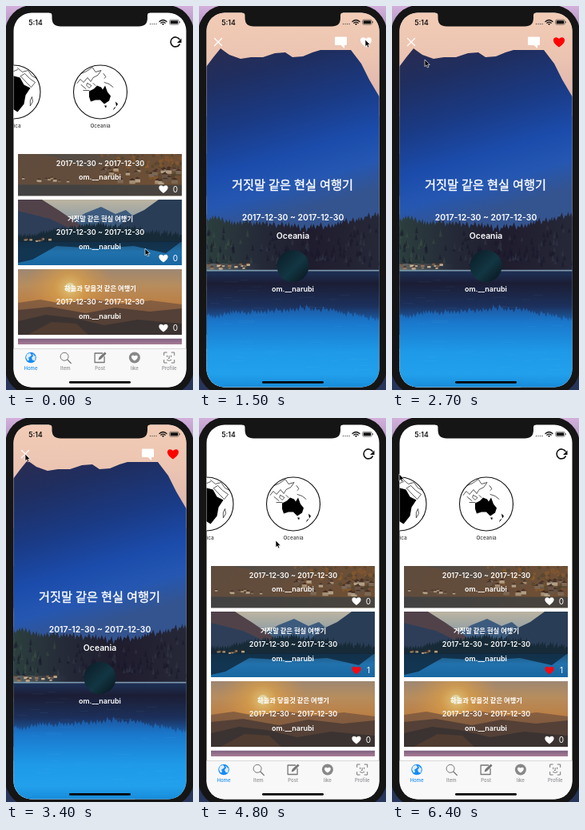
Recreate the animation shown at these times as an HTML page. Size 234x480 px, loop 6.5 s.

```html
<!DOCTYPE html>
<html lang="ko">
<head>
<meta charset="utf-8">
<title>Travel diary</title>
<style>
html, body { margin: 0; width: 100%; height: 100%; overflow: hidden; background: #111; }
svg { display: block; width: 100%; height: 100%; }
text { font-family: Inter, "Noto Sans CJK KR", "Noto Sans CJK", sans-serif; text-anchor: middle; }
.card text { fill: #fff; font-weight: 600; font-size: 9px; }
.card .title { font-weight: 700; font-size: 8.3px; }
.card .count { font-weight: 400; font-size: 10px; }
#detail text { fill: #fff; font-weight: 600; font-size: 10.4px; }
#detail .title { font-weight: 500; font-size: 15.2px; stroke: #fff; stroke-width: .35px; }
#detail .author { font-size: 9px; }
.line { fill: none; stroke-linecap: round; stroke-linejoin: round; }
</style>
</head>
<body>
<svg id="stage" viewBox="0 0 234 480" preserveAspectRatio="none"></svg>
<script>
const LOOP = 6500, STEP = 100, WIDTH = 216;
const PUSH_AT = 270, LIKE_AT = 1700, POP_AT = 3914, SETTLE = 620;
const DATES = "2017-12-30 ~ 2017-12-30", AUTHOR = "om.__narubi";
const TITLE = "거짓말 같은 현실 여행기";
const HEART = "M0 5C-8 0-6-4.7-3-4.7-1.3-4.7-.4-3.9 0-3.1.4-3.9 1.3-4.7 3-4.7 6-4.7 8 0 0 5Z";

let seed = 7;
const random = () => (seed = seed * 16807 % 2147483647) / 2147483647;
const between = (a, b) => a + (b - a) * random();
const repeat = (n, make) => Array.from({ length: n }, (_, i) => make(i)).join("");

const gradient = (id, stops, direction = 'x2="0" y2="1"') =>
  `<linearGradient id="${id}" ${direction}>${stops.map(([at, color, alpha = 1]) =>
    `<stop offset="${at}" stop-color="${color}" stop-opacity="${alpha}"/>`).join("")}</linearGradient>`;
const rect = (x, y, w, h, fill, more = "") =>
  `<rect x="${x}" y="${y}" width="${w}" height="${h}" fill="${fill}" ${more}/>`;
const path = (d, fill, more = "") => `<path d="${d}" fill="${fill}" ${more}/>`;
const line = (d, stroke, width = 1, more = "") =>
  `<path class="line" d="${d}" stroke="${stroke}" stroke-width="${width}" ${more}/>`;
const text = (x, y, value, more = "") => `<text x="${x}" y="${y}" ${more}>${value}</text>`;
const heart = (x, y, scale, fill, more = "") =>
  path(HEART, fill, `transform="translate(${x} ${y}) scale(${scale})" ${more}`);

// Jagged conifer outline whose top follows topAt(x)
function forest(x0, x1, base, topAt, gap, jag) {
  let d = `M${x0} ${base}`;
  for (let x = x0; x < x1; x += gap * between(.7, 1.3)) {
    const top = topAt(x) - between(0, jag);
    d += `L${x.toFixed(1)} ${(top + jag * .9).toFixed(1)}L${(x + gap / 2).toFixed(1)} ${top.toFixed(1)}`;
  }
  return d + `L${x1} ${base}Z`;
}

const houses = (n, x0, x1, y0, y1, size) => repeat(n, () => {
  const x = between(x0, x1), y = between(y0, y1), w = between(.6, 1) * size;
  const wall = ["#b9a184", "#8d7660", "#c8b497", "#75604f"][Math.floor(between(0, 4))];
  return rect(x, y, w, w * .6, wall) +
    path(`M${x - .5} ${y}l${w / 2 + .5}${-w * .4} ${w / 2 + .5} ${w * .4}z`, "#51362b");
});

function lakePhoto() {
  const treeTop = x => x < 140 ? 266 + 12 * (x - 9) / 131 : 278 - 18 * (x - 140) / 86;
  const trees = forest(8, 228, 332, treeTop, 4, 6);
  const shades = repeat(130, () => {
    const x = between(9, 226), y = between(treeTop(x) + 6, 318);
    const light = x < 70 ? "#3d5145" : "#343a4a";
    return path(`M${x} ${y}l-2 ${between(6, 10)}h4z`, random() < .6 ? "#16172a" : light, 'opacity=".5"');
  });
  return rect(9, 8, 217, 130, "url(#sky)") +
    path("M9 76L18 64 27 53 31 56 38 61 52 66 65 64 80 64 95 59 108 58 117 64 130 63 142 58 152 55 190 55 203 72 213 92 226 114V335H9Z", "url(#ridge)") +
    rect(9, 328, 217, 150, "url(#water)") +
    path(trees, "url(#reflection)", 'transform="translate(0 613) scale(1 -.85)"') +
    path(trees, "url(#trees)") + shades +
    rect(9, 322, 70, 8, "url(#village)") + houses(14, 9, 66, 322, 327, 5) +
    rect(9, 329.8, 217, 1.7, "#8aaecb", 'opacity=".85"') +
    repeat(40, () => rect(between(9, 205), between(340, 475), between(8, 24), .5, "#7cc6f4", 'opacity=".12"'));
}

// Card pictures are 205 x 82
const pictures = {
  village: () => rect(0, 0, 205, 82, "url(#town)") +
    path("M0 25L45 33 88 47 130 37 163 20 205 12V68H0Z", "#77583f", 'opacity=".65"') +
    repeat(90, () => `<circle cx="${between(105, 205)}" cy="${between(27, 62)}" r="${between(1, 3)}" fill="${random() < .5 ? "#a66a31" : "#594b34"}" opacity=".6"/>`) +
    houses(28, 100, 198, 47, 64, 8) + houses(10, 2, 70, 58, 64, 5) +
    rect(0, 68, 205, 14, "#48494a", 'opacity=".85"'),
  lake: () => rect(0, 0, 205, 82, "url(#cardSky)") +
    path("M55 35L84 17 104 9 122 18 135 13 160 34V52H55Z", "#45688f") +
    path("M0 0H30L52 14 74 29 98 46V52H0Z", "#5c4b54") +
    path("M0 14L40 24 88 47V52H0Z", "#2b4668", 'opacity=".8"') +
    path("M205 0H176L158 13 139 22 116 42V52H205Z", "#2f4562") +
    rect(0, 49, 205, 33, "url(#cardWater)") +
    path(forest(0, 205, 53, x => 38 + 6 * Math.cos(x / 33), 3, 5), "#1a303f") +
    path("M0 52H205L185 67 145 58 100 61 48 58 18 75 0 79Z", "#122c44", 'opacity=".8"') +
    houses(9, 2, 45, 48, 51, 4),
  sunrise: () => rect(0, 0, 205, 82, "url(#dawn)") +
    `<circle cx="65" cy="24" r="55" fill="url(#glow)"/><circle cx="65" cy="23" r="6" fill="#fff0b8"/>` +
    path("M0 42L28 38 55 43 90 37 130 43 166 39 205 44V82H0Z", "#8a6248", 'opacity=".8"') +
    path("M0 51L40 47 85 55 122 48 165 53 205 49V82H0Z", "#60493e") +
    path("M0 65L35 57 70 61 108 70 150 63 205 68V82H0Z", "#433a38") +
    path("M12 82L42 66 73 68 88 82Z", "#6c4c39", 'opacity=".6"'),
  dusk: () => rect(0, 0, 205, 82, "url(#dusk)")
};

function card(y, picture, title, likeable) {
  return `<svg class="card" x="15" y="${y}" width="205" height="82">${pictures[picture]()}
    ${rect(0, 0, 205, 82, "#000", 'opacity=".12"')}
    ${text(103, 27, title, 'class="title"')}${text(103, 44, DATES)}${text(102.5, 61.5, AUTHOR)}
    ${heart(182, 73.5, 1, "#fff", likeable ? 'id="cardHeart"' : "")}
    ${text(197, 77, "0", `class="count" ${likeable ? 'id="cardCount"' : ""}`)}</svg>`;
}

const globe = (x, label, land, coast) =>
  `<g transform="translate(${x} 107.5)"><circle r="33.5" fill="#fff" stroke="#111" stroke-width="1.1"/>
   ${line(coast, "#111", .7)}${path(land, "#000")}${text(0, 44, label, 'font-size="6.5" fill="#222"')}</g>`;

function tabBar(id) {
  const icons = [
    ["Home", `<circle r="6.8" fill="#168cf5"/>` + path("M-5-4L-1-6 1-3-1-1-3 0-2 3-4 4-6 0ZM2-5L6-1 5 4 2 3 1 0 3-2Z", "#f8f8f8", 'opacity=".9"')],
    ["Item", `<circle cx="-1.2" cy="-1.2" r="5" fill="none" stroke="#777"/>` + line("M2.5 2.5L7 7", "#777", 1.2)],
    ["Post", line("M3-5.5H-6.5V6H5.5V-1", "#777", 1.3) + path("M-2 3L-1-.5 6-7 8-5 1 2Z", "#777")],
    ["like", `<circle r="7" fill="#888"/>` + heart(0, .5, .7, "#fff")],
    ["Profile", line("M-6.5-3V-6.5H-3M3-6.5H6.5V-3M6.5 3V6.5H3M-3 6.5H-6.5V3M-2.5-2.5V-1M2.5-2.5V-1M0-2V1H-.8M-2.7 3Q0 5 2.7 3", "#777")]
  ];
  return `<g id="${id}">${rect(9, 428.5, 217, 50, "#f8f8f8", 'class="bar"')}${rect(9, 428.2, 217, .5, "#b5b5b5")}` +
    icons.map(([label, icon], i) => `<g transform="translate(${31 + 43.3 * i} 439.5)">${icon}
      ${text(0, 15.7, label, `font-size="6" font-weight="500" fill="${i ? "#8c8c91" : "#168cf5"}"`)}</g>`).join("") + "</g>";
}

const defs = `<defs>
  ${gradient("wall", [[0, "#d3b0dc"], [.12, "#8d76a2"], [.5, "#171b2b"], [1, "#28365b"]])}
  ${gradient("sky", [[0, "#f2ccb6"], [.4, "#ecc5b2"], [1, "#d9aeac"]])}
  ${gradient("ridge", [[0, "#2a2c50"], [.16, "#1f2e60"], [.36, "#1a3a84"], [.55, "#1b4cac"], [.68, "#2557b2"], [.8, "#34548f"]], 'x2=".22" y2="1"')}
  ${gradient("trees", [[0, "#2c3f3e"], [.3, "#252a38"], [.6, "#1f1c2d"], [1, "#262838"]], "")}
  ${gradient("reflection", [[0, "#1b3a70", .35], [.3, "#1c2a50", .85], [.75, "#1b1d34"], [1, "#1d2c50", .8]])}
  ${gradient("water", [[0, "#20406f"], [.3, "#1c539c"], [.45, "#1a78cc"], [.7, "#1e9ae8"], [.88, "#22a0ec"], [1, "#168ad8"]])}
  ${gradient("village", [[0, "#7d7d7c", .7], [1, "#4a5060", 0]], "")}
  ${gradient("avatar", [[0, "#0a1a24"], [.55, "#123643"], [1, "#081219"]], 'x2="1" y2="1"')}
  ${gradient("town", [[0, "#565654"], [.55, "#65574b"], [1, "#8d6139"]], 'x2="1" y2=".35"')}
  ${gradient("cardSky", [[0, "#d5cdb8"], [.4, "#97acba"], [1, "#4d84aa"]])}
  ${gradient("cardWater", [[0, "#245b82"], [.5, "#2581c4"], [1, "#1c75b8"]])}
  ${gradient("dawn", [[0, "#b49a82"], [.25, "#d0a06a"], [.5, "#d59250"], [1, "#8c593c"]])}
  ${gradient("dusk", [[0, "#8e6d91"], [.1, "#c491ad"], [1, "#865c7d"]])}
  ${gradient("edge", [[0, "#000", 0], [1, "#000", .2]], "")}
  <radialGradient id="glow"><stop stop-color="#ffe08b"/><stop offset=".35" stop-color="#f7b452" stop-opacity=".7"/><stop offset="1" stop-color="#f0a04a" stop-opacity="0"/></radialGradient>
  <clipPath id="screen"><rect x="9.5" y="8.5" width="216" height="468" rx="22.5"/></clipPath>
  <clipPath id="feed"><rect x="9" y="185" width="217" height="238"/></clipPath>
</defs>`;

const list = `<g id="list">${rect(9, 8, 285, 470, "#fff")}
  ${globe(9.5, "Africa", "M-21-17L-7-22 8-18 13-9 21-5 15 4 13 15 5 25-3 20-6 4-20 2-25-7Z",
    "M5-30L11-25 18-27 23-20 29-17M9-20L14-23 20-17 27-12 22-6 17-11ZM-10-29L-2-25 5-28M21 10L23 6 24 12 21 17Z")}
  ${globe(118, "Oceania", "M-14-1L-8-4-4-8 1-6 3-3 6-8 9 0 13 5 11 11 5 15 0 10-6 10-12 12-14 6ZM5 17H8L7 20ZM19 12L22 15 20 18ZM17 20L20 18 16 23Z",
    "M-24-23L-17-26-10-31-6-25 1-27-3-21-9-18-12-13-16-18-21-12-25-16-29-11M-24-9L-18-4M-16-11L-11-8-14-5-17-8ZM-9-11L-6-8M5-12L11-10 16-6M4-23L7-19 5-17M-21-2L-14-2")}
  <g clip-path="url(#feed)">
    ${card(155.5, "village", "")}${card(242, "lake", TITLE, true)}
    ${card(329, "sunrise", "하늘과 닿을것 같은 여행기")}${card(415.5, "dusk", "")}
  </g>${tabBar("listTabs")}</g>`;

const detail = `<g id="detail">${rect(1, 8, 8.5, 470, "url(#edge)")}${lakePhoto()}
  ${text(117, 229, TITLE, 'class="title"')}
  ${text(117.5, 267.5, DATES)}${text(117.5, 290.5, "Oceania")}
  <circle cx="117.5" cy="325" r="20" fill="url(#avatar)"/>
  ${text(117.5, 357, AUTHOR, 'class="author"')}</g>`;

const detailNav = `<g id="detailNav">${line("M19.5 40.5l9 9m0-9l-9 9", "#fff", 1.2)}
  ${path("M171 38.5H184Q185 38.5 185 39.5V48Q185 49 184 49H182V53L177.5 49H171Q170 49 170 48V39.5Q170 38.5 171 38.5Z", "#fff")}
  ${heart(209, 45.2, 1.25, "#fff", 'id="navHeart"')}</g>`;

const refresh = `<g id="refresh">${line("M217.2 48A6 6 0 1 1 217 41.5", "#111", 1.6)}${path("M219.5 40.5V46H214Z", "#111")}</g>`;

const status = text(37, 23.5, "5:14", 'font-size="8.6" font-weight="600" fill="#111"') +
  repeat(4, i => `<circle cx="${180.5 + i * 2.5}" cy="22.5" r=".7" fill="#555"/>`) +
  line("M192 19.5Q196.5 15.5 201 19.5M193.8 21.2Q196.5 18.9 199.2 21.2", "#111", 1.3) +
  path("M195 22.3Q196.5 21.2 198 22.3L196.5 24Z", "#111") +
  rect(204.7, 17.2, 11.5, 6, "none", 'rx="1.6" stroke="#333" stroke-width=".6"') +
  rect(205.7, 18.2, 9.5, 4, "#111", 'rx=".8"') + rect(216.9, 19.2, .8, 2, "#333");

const stage = document.getElementById("stage");
stage.innerHTML = defs + rect(0, 0, 234, 480, "url(#wall)") +
  rect(-1, -1, 236, 487, "#151515", 'rx="34"') +
  `<g clip-path="url(#screen)">${list}${rect(9, 8, 217, 470, "#000", 'id="dim"')}${detail}
   ${tabBar("overTabs")}${refresh}${detailNav}${status}
   ${rect(79, 469, 77, 2.8, "#050505", 'rx="1.4"')}</g>` +
  path("M54 8H180V8.6Q177 8.6 177 12V15Q177 25.5 166 25.5H68.5Q57.5 25.5 57.5 15V12Q57.5 8.6 54 8.6Z", "#151515") +
  path("M0 0V8.7L2 6.9 3.4 10 4.9 9.3 3.6 6.4H6.2Z", "#000", 'id="cursor" stroke="#fff" stroke-width=".65"');

const parts = {};
stage.querySelectorAll("[id]").forEach(el => parts[el.id] = el);
const set = (id, name, value) => parts[id].setAttribute(name, value);
parts.overTabs.querySelector(".bar").setAttribute("opacity", ".78");

// Critically damped spring from 0 to 1
function spring(ms) {
  if (ms <= 0) return 0;
  if (ms >= SETTLE) return 1;
  const k = ms * .018;
  return 1 - (1 + k) * Math.exp(-k);
}

const cursorStops = [
  [0, 174, 303], [300, 174, 303], [600, 194, 183], [1200, 208, 42], [1800, 208, 42],
  [2700, 41, 67], [3200, 24, 45], [4100, 24, 45], [4800, 96, 153], [5400, 96, 153], [6400, 9, 70], [6500, 9, 70]
];
function cursorAt(t) {
  const i = cursorStops.findIndex(stop => stop[0] > t);
  const [t0, x0, y0] = cursorStops[i - 1], [t1, x1, y1] = cursorStops[i];
  const u = (t - t0) / (t1 - t0), ease = u * u * (3 - 2 * u);
  return [x0 + (x1 - x0) * ease, y0 + (y1 - y0) * ease];
}

function draw(t) {
  const popping = t >= POP_AT, popped = spring(t - POP_AT);
  const shown = popping ? 1 - popped : spring(t - PUSH_AT);
  const liked = t >= LIKE_AT;
  set("list", "transform", `translate(${-.3 * WIDTH * shown} 0)`);
  set("detail", "transform", `translate(${WIDTH * (1 - shown)} 0)`);
  set("detail", "visibility", shown ? "visible" : "hidden");
  set("dim", "opacity", .1 * shown);
  set("listTabs", "visibility", popping && shown ? "hidden" : "visible");
  set("overTabs", "visibility", popping && shown ? "visible" : "hidden");
  set("detailNav", "opacity", popping ? 0 : shown);
  set("refresh", "opacity", popping ? Math.max(0, popped * 2 - 1) : 1 - Math.min(1, shown * 2));
  set("navHeart", "fill", liked ? "#f00" : "#fff");
  set("cardHeart", "fill", liked ? "#f00a14" : "#fff");
  parts.cardCount.textContent = liked ? "1" : "0";
  set("cursor", "transform", `translate(${cursorAt(t).join(" ")})`);
}

const start = performance.now();
function tick() {
  const t = (performance.now() - start) % LOOP;
  draw(Math.floor(t / STEP) * STEP);
  requestAnimationFrame(tick);
}
tick();
</script>
</body>
</html>
```
